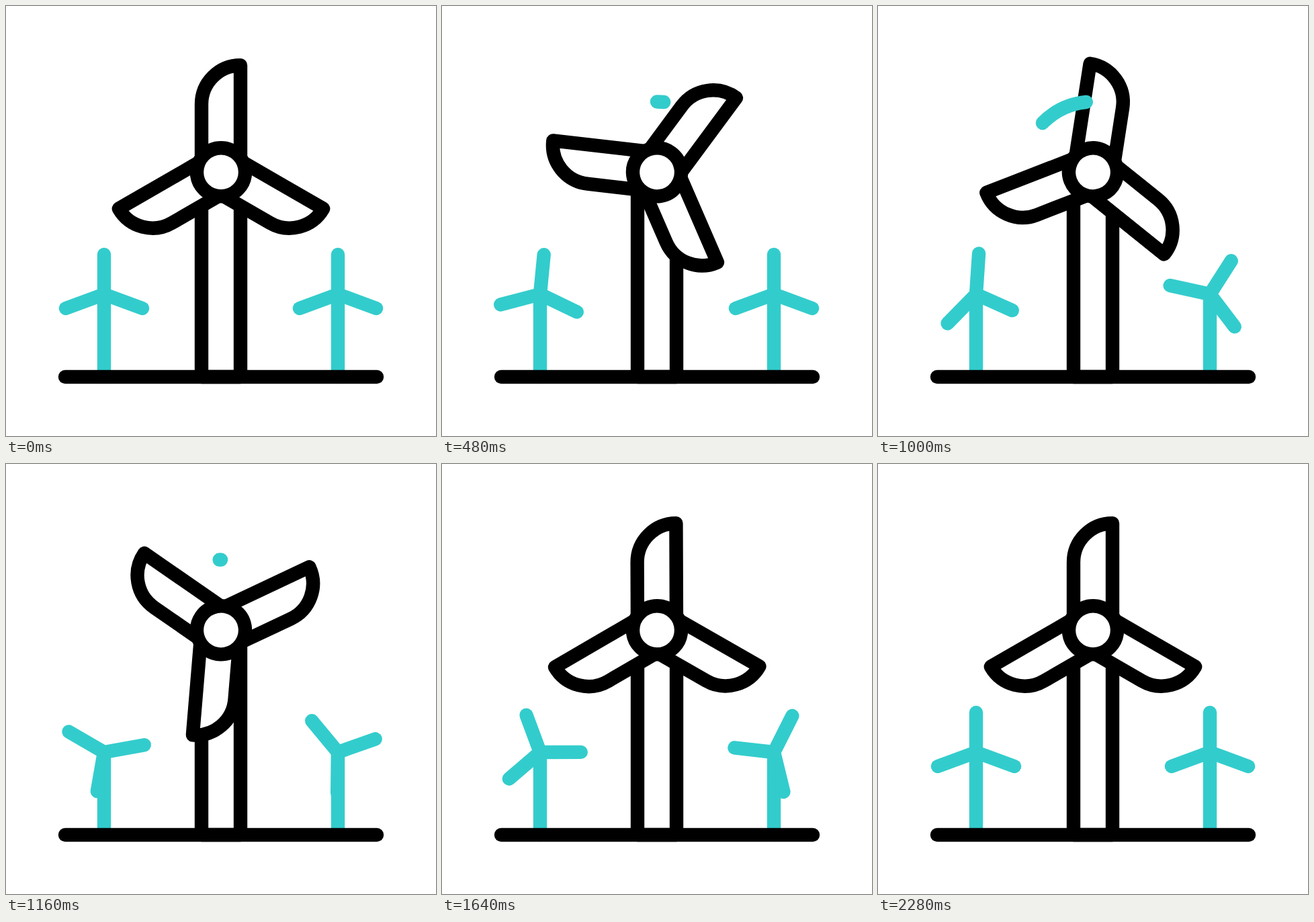
Animation, 640 px wide and 640 px high, one loop 2.32 s. Source, as an HTML page:

```html
<!DOCTYPE html>
<html lang="en">
<head>
<meta charset="utf-8">
<title>Wind turbines</title>
<style>
  html, body { margin: 0; width: 100%; height: 100%; overflow: hidden; background: #fff; }
  svg { display: block; width: 100vw; height: 100vh; }
  .line { fill: #fff; stroke: #000; stroke-width: 20.4; stroke-linecap: round; stroke-linejoin: round; }
  .teal { fill: none; stroke: #3cc; }
</style>
</head>
<body>
<svg viewBox="0 0 640 640" class="line">
  <defs>
    <path id="blade" d="M-29-25V-101A58 58 0 0 1 29-159V-25"/>
    <path id="arms" d="M0-59V0L57 21M0 0L-57 21"/>
  </defs>
  <g class="teal">
    <path d="M146 429V552M494 429V552"/>
    <g transform="translate(146 429)"><use href="#arms" id="left"/></g>
    <g transform="translate(494 429)"><use href="#arms" id="right"/></g>
  </g>
  <path d="M291 552V270H349V552Z"/>
  <path d="M88 552H552"/>
  <g transform="translate(320 247.3)">
    <g id="rotor">
      <use href="#blade"/>
      <use href="#blade" transform="rotate(-120)"/>
      <use href="#blade" transform="rotate(120) scale(-1 1)"/>
      <circle r="36"/>
    </g>
    <circle id="gust" class="teal" r="104.8" pathLength="360" transform="rotate(-90)"/>
  </g>
</svg>
<script>
const LOOP = 2320, STEP = 40, PULL = 0.58;
const el = id => document.getElementById(id);

// cubic-bezier(PULL, 0, 1 - PULL, 1), solved by bisection
function ease(x) {
  if (x <= 0) return 0;
  if (x >= 1) return 1;
  let lo = 0, hi = 1, y;
  for (let i = 0; i < 30; i++) {
    const s = (lo + hi) / 2;
    y = s * s * (3 - 2 * s);
    if (y + 3 * PULL * s * (1 - s) * (1 - 2 * s) < x) lo = s; else hi = s;
  }
  return y;
}

const turn = (t, start, length) => 360 * ease((t - start) / length);
const spin = (id, angle) => el(id).setAttribute('transform', `rotate(${angle})`);

function draw(now) {
  const t = Math.floor(now % LOOP / STEP) * STEP;
  spin('rotor', turn(t, 40, 1640));
  spin('left', turn(t, 280, 1720));
  spin('right', turn(t, 560, 1720));

  const head = turn(t, 400, 680), tail = turn(t, 520, 680);
  const gust = el('gust').style;
  gust.visibility = head > tail ? 'visible' : 'hidden';
  gust.strokeDasharray = `${head - tail} 360`;
  gust.strokeDashoffset = -tail;
}

const begin = performance.now();
function tick() {
  draw(performance.now() - begin);
  requestAnimationFrame(tick);
}
tick();
</script>
</body>
</html>
```
